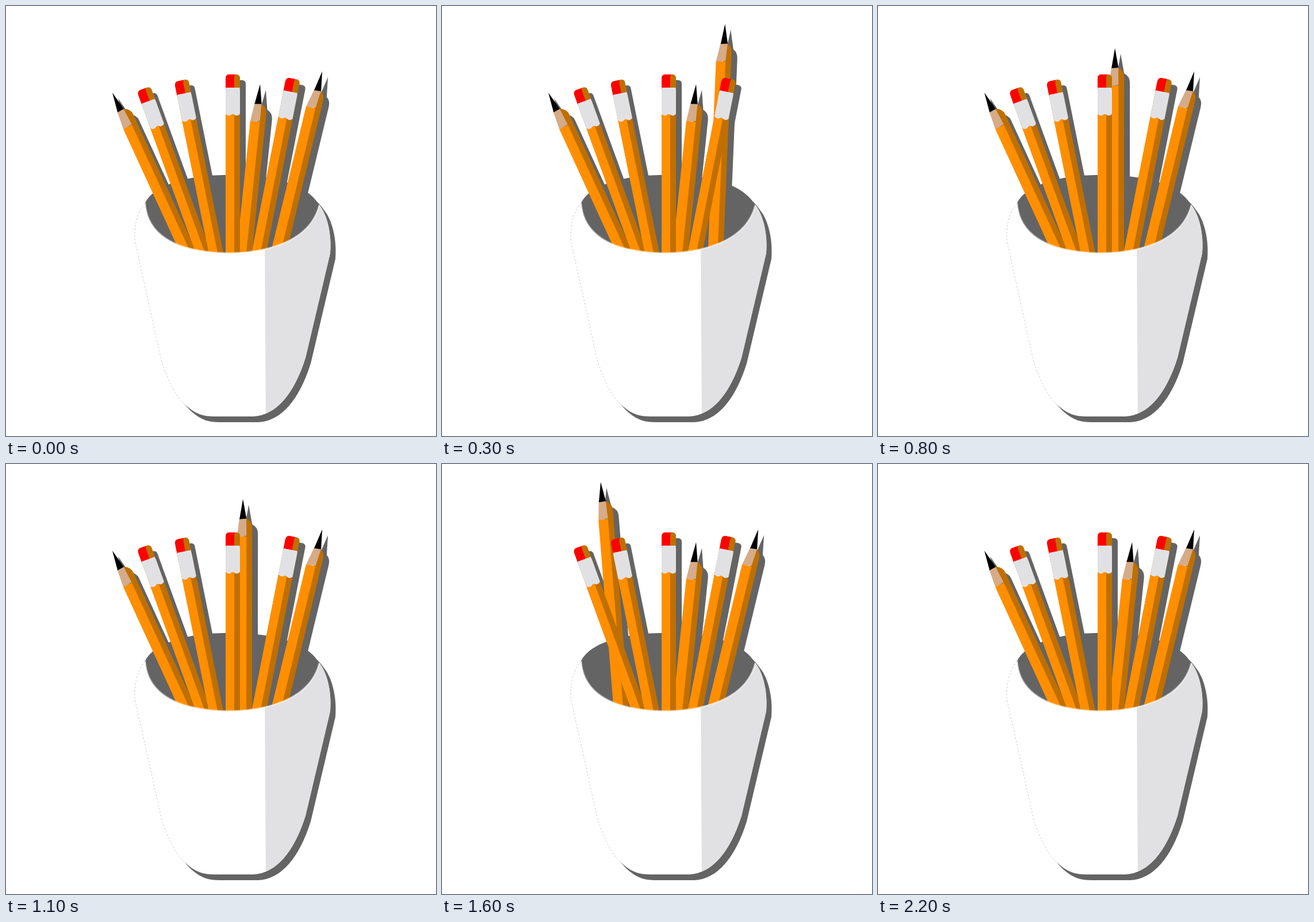
Animation, 748 px wide and 748 px high, one loop 2.3 s. Source, as an HTML page with a canvas:

```html
<!DOCTYPE html>
<html lang="en">
<head>
<meta charset="utf-8">
<title>Pencil cup</title>
<style>
  html, body { margin: 0; width: 100%; height: 100%; overflow: hidden; background: #fff; }
  canvas { display: block; }
</style>
</head>
<body>
<canvas id="stage" width="748" height="748"></canvas>
<script>
const ctx = document.getElementById('stage').getContext('2d');
const LOOP = 2300, STEP = 100, HOLD = 100;
const GREY = '#646464', ORANGE = '#ff8f00', BROWN = '#bf6f00',
      WOOD = '#d5ab88', PALE = '#e1e1e4';
const WIDTH = 26.5, SHADE = .63;

// Each sharp pencil slides out of its foot (x, y) by `lift` while its lean
// turns from `rest` to `top`, then drops back; `left` is its edge beside the tip.
const sharp = [
  { x: 307, y: 416, length: 292, lift: 94, rest: -24.7, top: -4.6, ease: 2,
    left: -9.2, start: 1200, up: 400, down: 500 },
  { x: 412, y: 426.5, length: 292, lift: 92, rest: 5.9, top: 0, ease: 3.3,
    left: -10.5, start: 600, up: 300, down: 500 },
  { x: 476, y: 420, length: 315, lift: 74, rest: 13.6, top: 2.4, ease: 2.3,
    left: -13, start: 0, up: 300, down: 400 }
];
// top centre and lean of the pencils with erasers
const blunt = [
  { x: 239.5, y: 144, lean: -20 },
  { x: 305, y: 129.5, lean: -11.4 },
  { x: 499.5, y: 126.5, lean: 11.1 },
  { x: 394.5, y: 119, lean: 0 }
];

const rim = 'C534 390 496 412 450 423C410 432 365 432 325 423C275 412 245 385 242 343';
const side = 'M242 343C230 358 223 375 224 408L270 615C282 655 298 684 318 699';
const cup = side + 'C331 710 345 714 362 714H430C470 712 501 675 521 612' +
            'L564 430C567 395 558 362 545 346';
const back = 'C520 305 455 294 385 294C315 294 256 312 242 343Z';
const front = new Path2D(cup + rim + 'Z');
const whole = new Path2D(cup + back);
const inside = new Path2D('M242 343C245 385 275 412 325 423' +
  'C365 432 410 432 450 423C496 412 534 390 545 346' + back);

function fill(color, path) {
  ctx.fillStyle = color;
  ctx.fill(typeof path === 'string' ? new Path2D(path) : path);
}

function stroke(color, width, path) {
  ctx.strokeStyle = color;
  ctx.lineWidth = width;
  ctx.stroke(new Path2D(path));
}

function place({ x, y, lean }, draw, shift = 0) {
  ctx.save();
  ctx.translate(x + shift, y + shift);
  ctx.rotate(lean * Math.PI / 180);
  draw();
  ctx.restore();
}

const ramp = (t, from, span) => Math.min(1, Math.max(0, (t - from) / span));

function tipAt(p, t) {
  const up = ramp(t, p.start, p.up);
  const down = ramp(t, p.start + p.up + HOLD, p.down);
  // the lean settles early on the way up and returns late on the way down
  const tilt = down ? down ** p.ease : (1 - up) ** 5;
  const lean = p.top + (p.rest - p.top) * tilt;
  const reach = p.length + p.lift * (up - down);
  const a = lean * Math.PI / 180;
  return { x: p.x + reach * Math.sin(a), y: p.y - reach * Math.cos(a), lean };
}

function sharpShadow(l) {
  const r = l + WIDTH;
  fill(GREY, `M0 0L-6 34L${l} 66V400H${r}V50Q${r} 39 6 34Z`);
}

function sharpPencil(l) {
  const r = l + WIDTH, d = l + WIDTH * SHADE;
  fill(BROWN, `M5 34H6Q${r} 39 ${r} 50V400H${d - 1}V64Z`);
  fill(ORANGE, `M${l} 65H${d}V400H${l}Z`);
  fill(WOOD, `M-6 33H6L${d} 64L${l} 66Z`);
  fill('#000', 'M0 0L6.2 34L-6 35Z');
}

const bluntShape = 'M-12.5 7Q-12 0 -6 0H7Q12.5 1 12.5 6V370H-12.5Z';

function bluntPencil() {
  fill(BROWN, bluntShape);
  fill(ORANGE, 'M-12.5 60H2.5V370H-12.5Z');
  fill('#f00', 'M-12.5 24V7Q-12 0 -6 0H4Q2.5 2 2.5 6V24Z');
  fill(PALE, 'M-12 23H12L12.5 28V69Q8 73 4 71Q0 67 -4 71Q-8 73 -12.5 69V28Z');
}

function drawCupFront() {
  fill('#fff', front);
  ctx.save();
  ctx.clip(front);
  fill(PALE, 'M449.5 300H600V740H452Z');
  ctx.restore();
  stroke('rgba(255,255,255,.45)', 3, 'M545 346' + rim);
  ctx.setLineDash([3, 3]);
  stroke('#aaa', .6, side);
  ctx.setLineDash([]);
}

function draw(t) {
  ctx.clearRect(0, 0, 748, 748);
  const tips = sharp.map(p => tipAt(p, t));
  sharp.forEach((p, i) => place(tips[i], () => sharpShadow(p.left), 10));
  blunt.forEach(b => place(b, () => fill(GREY, bluntShape), 10));
  place({ x: -1, y: 0, lean: 0 }, () => fill(GREY, whole), 10);
  fill(GREY, inside);
  sharp.forEach((p, i) => place(tips[i], () => sharpPencil(p.left)));
  blunt.forEach(b => place(b, bluntPencil));
  drawCupFront();
}

const begin = performance.now();
function tick() {
  const t = (performance.now() - begin) % LOOP;
  draw(Math.floor(t / STEP) * STEP);
  requestAnimationFrame(tick);
}
tick();
</script>
</body>
</html>
```
